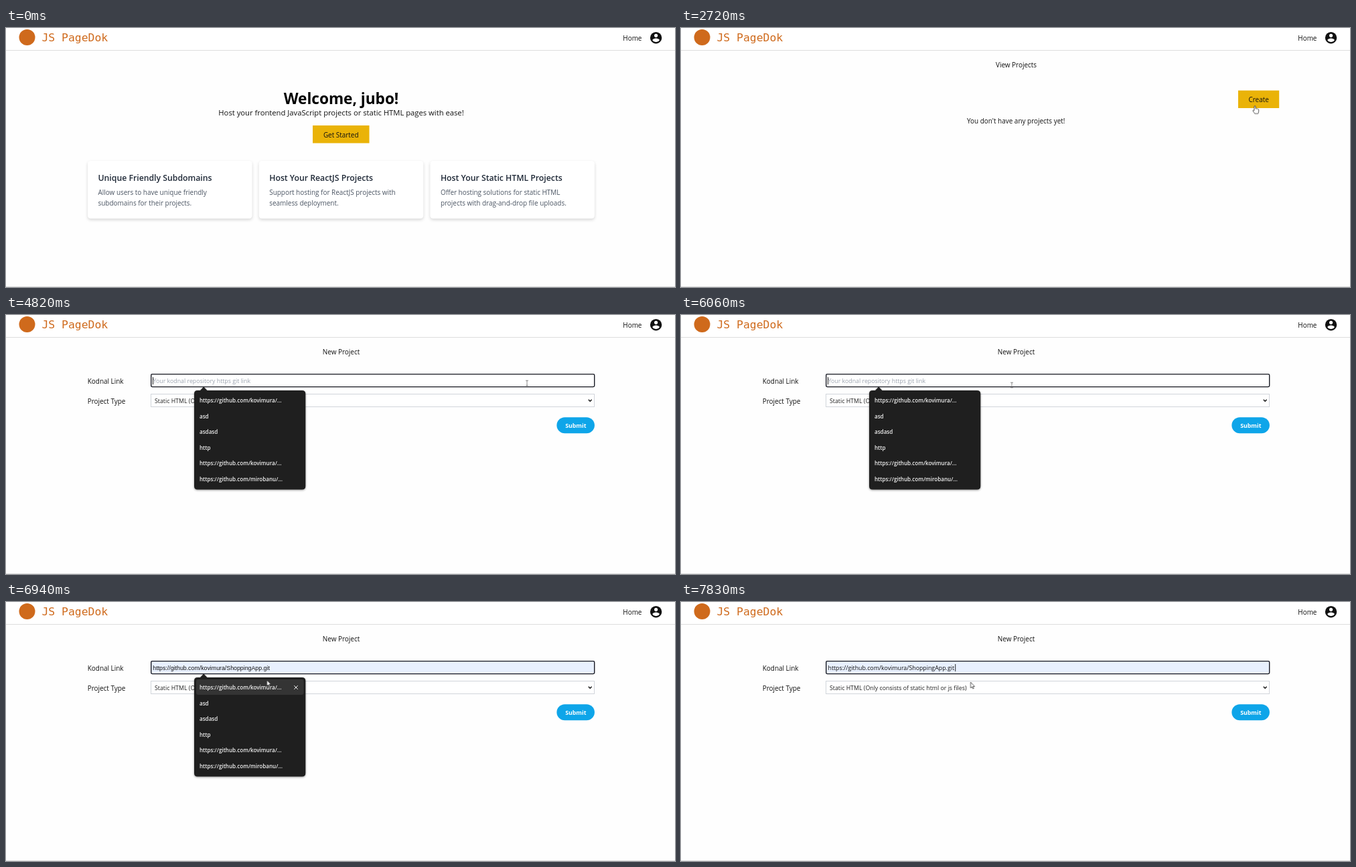
Animation, 999 px wide and 388 px high, one loop 8 s. Source, as an HTML page:

```html
<!DOCTYPE html>
<html lang="en">
<head>
<meta charset="utf-8">
<title>Project hosting demo</title>
<style>
html, body { margin: 0; width: 100%; height: 100%; overflow: hidden; background: #fefefe; }
svg { display: block; width: 100%; height: 100%; font: 9.95px "Open Sans", sans-serif; fill: #111; }
.mid { text-anchor: middle; }
.brand { font: 16.4px "DejaVu Sans Mono", monospace; fill: #cf6a1c; }
.hero { font-size: 22.6px; font-weight: 700; fill: #000; }
.lead { font-size: 11.24px; }
.card { fill: #fff; filter: drop-shadow(0 2px 2px rgb(0 0 0 / .16)); }
.title { font-size: 12.25px; font-weight: 600; fill: #1f2937; }
.note { fill: #4b5563; }
.button { fill: #eab308; }
.field { font-size: 8.8px; }
.hint { fill: #9ca3af; }
.preview { font-family: "Liberation Sans", Arial, sans-serif; }
.box { fill: #fff; stroke: #d1d5db; }
.fill { fill: #e8f0fe; }
.ring { fill: none; stroke: #14161f; stroke-width: 1.35; }
.submit { font-size: 8.8px; font-weight: 700; fill: #fff; }
.menu { font-size: 8.07px; font-weight: 600; fill: #f1f1f1; }
.panel { fill: #1f1f1f; filter: drop-shadow(0 1px 1.5px rgb(0 0 0 / .4)); }

/* Timed layers; 1% of the loop is 80 ms */
.timed { opacity: 0; animation: 8s step-end infinite; }
.home { animation-name: home; }
.list { animation-name: list; }
.form { animation-name: form; }
.load { animation-name: load; }
.empty { animation-name: empty; }
.focus { animation-name: focus; }
.caret { animation-name: caret; }
.pick { animation-name: pick; }
.done { animation-name: done; }
.popup { animation-name: popup; }
.arrow { animation-name: arrow; }
.hand { animation-name: hand; }
.beam { animation-name: beam; }
.wheel { transform-origin: 989px 12.5px; animation: turn .4s linear infinite; }
.pointer { animation: travel 8s ease-in-out infinite; }

@keyframes home { 0% { opacity: 1 } 17.75%, 100% { opacity: 0 } }
@keyframes list { 17.75% { opacity: 1 } 42.5%, 100% { opacity: 0 } }
@keyframes form { 42.5%, 100% { opacity: 1 } }
@keyframes load {
  14.25%, 39.88% { opacity: 1 }
  21.12%, 45%, 100% { opacity: 0 }
}
@keyframes empty { 0% { opacity: 1 } 80.5%, 100% { opacity: 0 } }
@keyframes focus { 60.25%, 100% { opacity: 1 } }
@keyframes caret {
  60.25%, 72.75% { opacity: 1 }
  66.5%, 79%, 100% { opacity: 0 }
}
@keyframes pick { 80.5% { opacity: 1 } 93.5%, 100% { opacity: 0 } }
@keyframes done { 93.5%, 100% { opacity: 1 } }
@keyframes popup {
  60.25% { opacity: 1 }
  93.5% { opacity: 1; animation-timing-function: linear }
  95.5%, 100% { opacity: 0 }
}
@keyframes arrow {
  3.12%, 14.25%, 42.5%, 78% { opacity: 1 }
  8.75%, 32.5%, 52% { opacity: 0 }
  100% { opacity: 1 }
}
@keyframes hand {
  8.75%, 32.5% { opacity: 1 }
  14.25%, 42.5%, 100% { opacity: 0 }
}
@keyframes beam { 52% { opacity: 1 } 78%, 100% { opacity: 0 } }
@keyframes turn { to { transform: rotate(360deg) } }
@keyframes travel {
  0%, 3.12% { transform: translate(898px, 362px) }
  9.87%, 24% { transform: translate(503.5px, 164.5px) }
  34%, 34.5% { transform: translate(857px, 116.5px) }
  35.75%, 46% { transform: translate(861px, 113px) }
  49.4% { transform: translate(842px, 112px) }
  53.6%, 64.8% { transform: translate(778px, 102px) }
  75.7% { transform: translate(494px, 105px) }
  85% { transform: translate(396px, 122px) }
  86.7% { transform: translate(389.5px, 117px) }
  89.4%, 93.2% { transform: translate(392px, 121px) }
  97.9%, 100% { transform: translate(432.5px, 120px) }
}
</style>
</head>
<body>
<svg viewBox="0 0 999 388">
  <rect width="999" height="33" fill="#fff"/>
  <path d="M0 33.5H999M0 387.5H999" stroke="#dedede" stroke-width="1.2"/>
  <circle cx="31.5" cy="14" r="12" fill="#cf6a1c"/>
  <text class="brand" x="53.5" y="19.5">JS PageDok</text>
  <text x="921.3" y="18.5">Home</text>
  <circle cx="970.6" cy="14.7" r="8.7"/>
  <g fill="#fff">
    <circle cx="970.6" cy="11.3" r="2.6"/>
    <path d="M965.4 18.2C965.5 16.5 968.8 15.5 970.6 15.5S975.7 16.5 975.8 18.2A6.2 6.2 0 0 1 965.4 18.2Z"/>
  </g>

  <g class="timed home">
    <text class="hero mid" x="500.5" y="114">Welcome, jubo!</text>
    <text class="lead mid" x="500.5" y="131">Host your frontend JavaScript projects or static HTML pages with ease!</text>
    <rect class="button" x="458" y="146" width="84.5" height="26.5"/>
    <text class="mid" x="500.2" y="163.5">Get Started</text>
    <g>
      <rect class="card" x="122" y="199" width="245.5" height="86.5" rx="4.5"/>
      <text class="title" x="137.5" y="229">Unique Friendly Subdomains</text>
      <text class="note" x="137.5" y="250">Allow users to have unique friendly</text>
      <text class="note" x="137.5" y="266">subdomains for their projects.</text>
    </g>
    <g transform="translate(255.7)">
      <rect class="card" x="122" y="199" width="245.5" height="86.5" rx="4.5"/>
      <text class="title" x="137.5" y="229">Host Your ReactJS Projects</text>
      <text class="note" x="137.5" y="250">Support hosting for ReactJS projects with</text>
      <text class="note" x="137.5" y="266">seamless deployment.</text>
    </g>
    <g transform="translate(511.4)">
      <rect class="card" x="122" y="199" width="245.5" height="86.5" rx="4.5"/>
      <text class="title" x="137.5" y="229">Host Your Static HTML Projects</text>
      <text class="note" x="137.5" y="250">Offer hosting solutions for static HTML</text>
      <text class="note" x="137.5" y="266">projects with drag-and-drop file uploads.</text>
    </g>
  </g>

  <g class="timed list">
    <text class="mid" x="500.5" y="58.5">View Projects</text>
    <rect class="button" x="832" y="93.6" width="61.2" height="26.4"/>
    <text class="mid" x="862.6" y="111">Create</text>
    <text class="mid" x="500.2" y="142.5">You don't have any projects yet!</text>
  </g>

  <g class="timed form">
    <text class="mid" x="500.5" y="58.5">New Project</text>
    <text x="121.7" y="102.5">Kodnal Link</text>
    <text x="121.7" y="132.5">Project Type</text>
    <rect class="box" x="216.5" y="88.5" width="662" height="19"/>
    <g class="field">
      <text class="timed empty hint" x="219.5" y="102">Your kodnal repository https git link</text>
      <g class="timed pick">
        <rect class="fill" x="217" y="89" width="661" height="18"/>
        <text class="preview" x="219.3" y="102">https://github.com/kovimura/ShoppingApp.git</text>
      </g>
      <g class="timed done">
        <rect class="fill" x="217" y="89" width="661" height="18"/>
        <text x="219.5" y="102">https://github.com/kovimura/ShoppingApp.git</text>
        <rect x="409.3" y="93" width=".9" height="11"/>
      </g>
      <rect class="timed caret" x="219" y="93" width=".9" height="11"/>
      <rect class="timed focus ring" x="216.7" y="88.6" width="662" height="19" rx="1.8"/>
      <rect class="box" x="216.5" y="118.5" width="662" height="19"/>
      <text x="222" y="131.7" fill="#222">Static HTML (Only consists of static html or js files)</text>
    </g>
    <path d="M869.8 126.8L872.2 129.2L874.6 126.8" fill="none" stroke="#111" stroke-width="1.4"/>
    <rect x="822.4" y="153.3" width="56.5" height="24" rx="12" fill="#0ea5e9"/>
    <text class="submit mid" x="850.8" y="169">Submit</text>
  </g>

  <g class="timed popup menu">
    <path class="panel" d="M286 113H290L295.2 107.5L300.4 113H442Q447.3 113 447.3 118V256.5Q447.3 261.5 442 261.5H286Q281 261.5 281 256.5V118Q281 113 286 113Z"/>
    <g class="timed pick">
      <rect x="284" y="116" width="160.5" height="23" rx="3" fill="#343434"/>
      <path d="M430.2 125.2L435.8 130.8M435.8 125.2L430.2 130.8" stroke="#eee"/>
    </g>
    <text x="289" y="131">https://github.com/kovimura/...</text>
    <text x="289" y="154.6">asd</text>
    <text x="289" y="178.2">asdasd</text>
    <text x="289" y="201.8">http</text>
    <text x="289" y="225.4">https://github.com/kovimura/...</text>
    <text x="289" y="249">https://github.com/mirobanu/...</text>
  </g>

  <g class="timed load">
    <path class="wheel" d="M983.7 13.2A5.3 5.3 0 0 1 992.3 8.3" fill="none" stroke="#111" stroke-width="1.3"/>
  </g>

  <g class="pointer" fill="#fff" stroke="#222" stroke-width=".75" stroke-linejoin="round">
    <path class="timed arrow" d="M0 0V8.8L2 7L3.4 10L4.7 9.4L3.4 6.5H6Z"/>
    <path class="timed hand" d="M-1 6V.8Q0-.6 1 .8V4.2Q2.2 3.6 2.8 4.6Q4 4.1 4.4 5.1Q5.7 4.9 5.7 6.2V8.6Q5.5 10.2 4.7 11.8H-.2Q-1.5 9.6-3.2 7.6Q-3.4 6-1 7.2Z"/>
    <path class="timed beam" d="M-2-3.8H2M0-3.8V3.8M-2 3.8H2" fill="none" stroke="#666"/>
  </g>
</svg>
</body>
</html>
```
